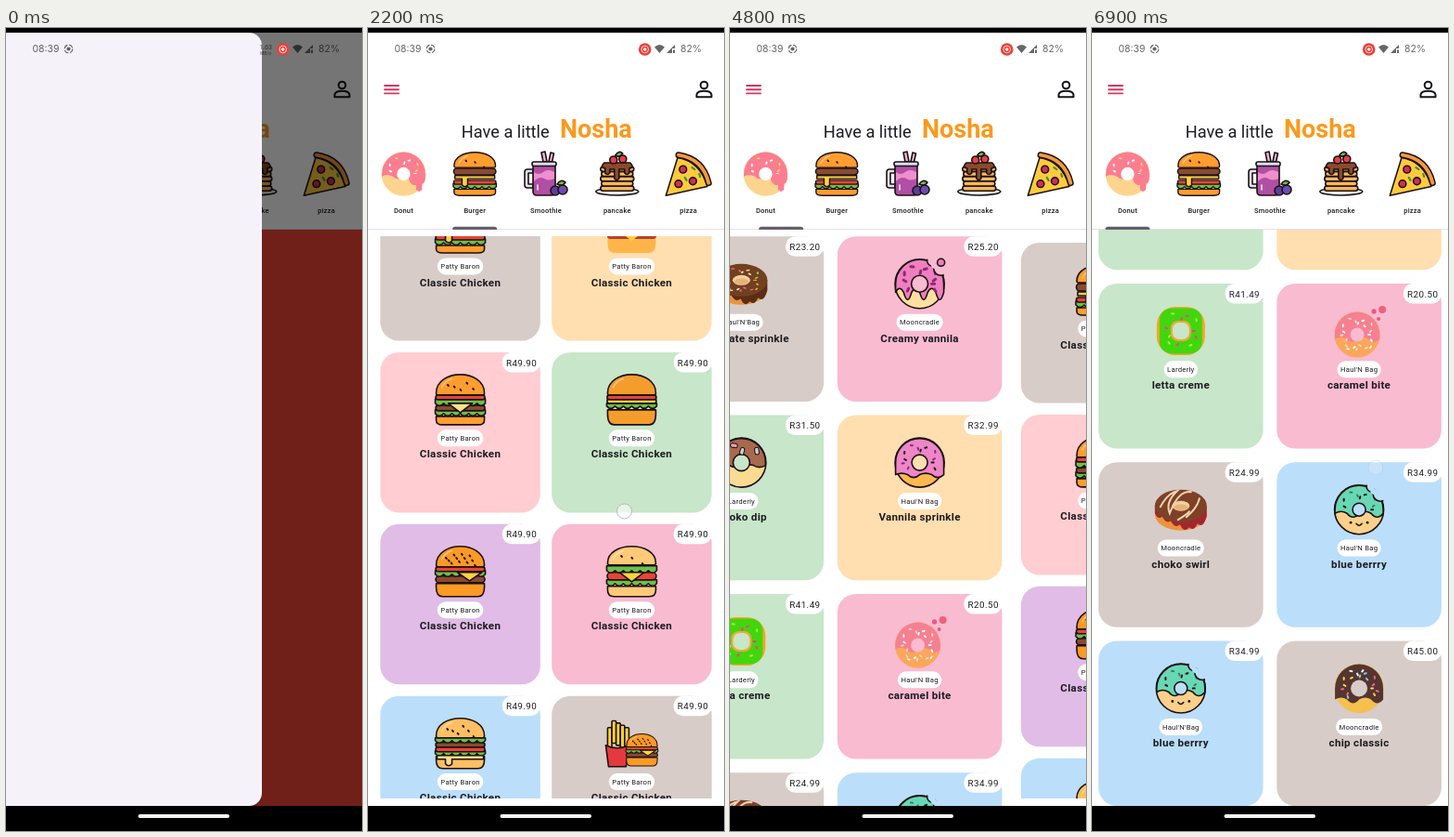
Animation of 384x864 px, one loop 7 s. Source, as an HTML page:

```html
<!DOCTYPE html>
<html lang="en">
<head>
<meta charset="utf-8">
<title>Snack menu</title>
<style>
  html, body { margin: 0; height: 100%; overflow: hidden; background: #000; }
  svg { display: block; width: 100vw; height: 100vh; font-family: Roboto, "Noto Sans", sans-serif; }
  .mid { text-anchor: middle; }
  .tab { font-size: 7.5px; font-weight: 500; letter-spacing: .2px; fill: #1d1b20; }
  .shop { font-size: 7.7px; letter-spacing: .25px; fill: #1d1b20; }
  .name { font-size: 11.6px; font-weight: 700; letter-spacing: .3px; fill: #1d1b20; }
  .price { font-size: 9.8px; letter-spacing: .45px; fill: #1d1b20; }
  .status { font: 10.4px Inter, Lato, sans-serif; }
  .ink { stroke: #1b1013; stroke-width: 1.6; stroke-linejoin: round; stroke-linecap: round; }
</style>
</head>
<body>
<svg id="stage" viewBox="0 0 384 864" preserveAspectRatio="none"></svg>
<script>
const path = (d, fill = 'none', more = '') => `<path d="${d}" fill="${fill}" ${more}/>`;
const rect = (x, y, w, h, fill, r = 0, more = '') =>
  `<rect x="${x}" y="${y}" width="${w}" height="${h}" rx="${r}" fill="${fill}" ${more}/>`;
const dot = (x, y, r, fill, more = '') => `<circle cx="${x}" cy="${y}" r="${r}" fill="${fill}" ${more}/>`;
const line = (d, color, w, more = '') =>
  path(d, 'none', `stroke="${color}" stroke-width="${w}" stroke-linecap="round" ${more}`);
const text = (x, y, s, cls, more = '') => `<text x="${x}" y="${y}" class="${cls}" ${more}>${s}</text>`;
const put = (x, y, inner, k = 1) => `<g transform="translate(${x} ${y}) scale(${k})">${inner}</g>`;
const ink = inner => `<g class="ink">${inner}</g>`;
const times = (n, f) => Array.from({ length: n }, (_, i) => f(i)).join('');

const GREEN = '#6cc04a', RED = '#ea4335', BROWN = '#8a4a2f', CHEESE = '#ffd23f', DARK = '#1b1013';

// Icons are drawn around 0,0 in a 56 px box.
const layers = {
  flat: (c, y, h) => rect(-26.5, y, 53, h, c, h / 2),
  wave: (c, y, h) => path(`M27 ${y}H-27V${y + h}` + times(6, () => 'q4.5 5 9 0') + 'Z', c),
  tri: (c, y, h, x = 0) => path(`M${x - 13} ${y}H${x + 13}L${x} ${y + h}Z`, c),
  drip: (c, y, h) => path(`M-25 ${y}H25V${y + 4}H-9v${h}q-3.5 4 -7 0v-${h}H-25Z`, c)
};

function burger({ bun, top = -5, bot = 14, peak = -27, seeds = 0, seed = DARK, flat, parts }) {
  const c = (peak - .25 * (top - 2)) / .75;
  const body =
    path(`M-26 ${bot}H26V${bot + 4}Q26 27 19 27H-19Q-26 27 -26 ${bot + 4}Z`, bun) +
    parts.map(([kind, ...a]) => layers[kind](...a)).join('') +
    path(`M-26 ${top - 2}C-26 ${c} 26 ${c} 26 ${top - 2}Q26 ${top} 24 ${top}H-24Q-26 ${top} -26 ${top - 2}Z`, bun);
  const grains = times(seeds, i => {
    const x = -17 + 34 * (i + .5) / seeds;
    return line(`M${x} ${peak + 8 + x * x / 60 + (i % 3) * 4}l.8 1`, seed, 2);
  });
  const shine = flat ? '' : line('M-20 -13Q-17 -20 -9 -22.5', '#fff', 1.4, 'opacity=".45"');
  return (flat ? body : ink(body)) + shine + grains;
}

const classic = burger({ bun: '#ff9d2e', top: -8, bot: 19, seeds: 3, parts: [
  ['wave', GREEN, 12, 4], ['flat', RED, 8, 5], ['drip', CHEESE, 2, 8], ['flat', BROWN, -7, 8]] });
const seeded = burger({ bun: '#fb9a25', bot: 13, seeds: 12, parts: [
  ['flat', BROWN, 5, 7], ['wave', GREEN, -1, 4], ['flat', RED, -5, 5], ['tri', CHEESE, 1, 9, 10]] });
const tall = burger({ bun: '#ffca78', top: -7, seeds: 3, bot: 16, parts: [
  ['wave', GREEN, 9, 4], ['flat', RED, 1, 8], ['wave', GREEN, -6, 5], ['tri', CHEESE, 1, 10]] });
const glazed = burger({ bun: '#ffbe62', top: -6, bot: 14, seeds: 6, parts: [
  ['wave', GREEN, 8, 3], ['flat', RED, 4, 5], ['flat', BROWN, -1, 5], ['wave', GREEN, -6, 3], ['drip', '#ffdc8c', 13, 5]] });
const combo = ink(
  times(5, i => rect(-26 + i * 4.6, -17 - (i * 3 % 4) * 2.4, 4.6, 24, CHEESE, 1)) +
  path('M-28 2Q-16 8 -3 2L-6 25H-25Z', '#e5383f')) + put(11, 7, seeded, .64);

const burgerArt = [
  classic,
  burger({ bun: '#fdb54a', top: 0, bot: 12, peak: -23, seeds: 9, seed: '#ffe6b4', flat: true, parts: [
    ['flat', '#b5422c', 6, 6], ['flat', '#85492f', 0, 8], ['tri', CHEESE, 4, 10]] }),
  burger({ bun: '#ff9d2e', bot: 18, seeds: 5, parts: [
    ['wave', GREEN, 11, 4], ['flat', BROWN, 6, 6], ['wave', GREEN, -1, 5], ['flat', RED, -5, 5], ['tri', '#ffe08a', 4, 10]] }),
  burger({ bun: '#f59d2c', bot: 11, parts: [
    ['wave', GREEN, 4, 3], ['flat', CHEESE, -1, 5], ['flat', RED, -5, 5]] }),
  seeded, tall, glazed, combo, classic
];

const sprinkles = (n, colors, maxY = 20, w = 2) => times(n, i => {
  const a = i * 2.4, r = 13 + (i * 5) % 9, x = r * Math.cos(a), y = r * Math.sin(a);
  const d = `M${x} ${y}l${w * Math.cos(a * 3)} ${w * Math.sin(a * 3)}`;
  return y > maxY ? '' : (w > 3 ? line(d, DARK, w + 2) : '') + line(d, colors[i % colors.length], w);
});

function donut({ base, frost, bg, y = 6, amp = 4, waves = 4, hole = 9, lined, bits, bitW, n = 16, maxY, bite }) {
  const step = 52 / waves;
  const wave = `M-26 ${y}V0A26 26 0 0 1 26 0V${y}` +
    times(waves, i => `q${-step / 2} ${(i % 2 ? -1 : 2) * amp} ${-step} 0`) + 'Z';
  const mouth = bite ? `<g clip-path="url(#disc)">${dot(14, -25, 6, bg)}${dot(23, -17, 8, bg)}` +
    dot(17, -21, 5, bg, 'stroke="none"') + '</g>' : '';
  const body = dot(0, 0, 26.5, base) + path(wave, frost) + dot(0, 0, hole, bg);
  const tail = sprinkles(n, bits, maxY ?? y - 2, bitW);
  return lined ? ink(body) + tail + ink(mouth) : body + tail + mouth;
}

function cakeRing(top, side, bits) {
  const e = (y, rx, ry, f) => `<ellipse cx="0" cy="${y}" rx="${rx}" ry="${ry}" fill="${f}"/>`;
  return e(5, 28, 17.5, '#e9953c') +
    path('M-28 -4V4q4 8 8 3q4 9 9 5q5 9 10 4q5 10 10 3q5 5 9 -4q6 6 10 -8V-4Z', side) +
    e(-4, 28, 17.5, top) + e(-4, 9.5, 5.5, '#f4cf9c') + e(-2.5, 7.5, 3.2, '#e6b27c') + bits;
}

const squash = s => `<g transform="translate(0 -4) scale(1.05 .66)">${s}</g>`;
const bubbles = dot(16, -21, 2.6, '#f0567f') + dot(25, -23, 4, '#f0607a') + dot(21, -13, 2, '#f0567f');
const smile = dot(-9, 14, 1.4, DARK) + dot(9, 14, 1.4, DARK) + line('M-3 15q3 4 6 0', DARK, 1.5);
const mint = bg => donut({ base: '#fbd08a', frost: '#68d8b4', bg, y: 4, hole: 7, lined: true, bits: [DARK, '#2d7e70'], bite: true }) + smile;

const donutArt = [
  () => cakeRing('#70401f', '#5a2d14', squash(sprinkles(20, ['#ff9d3a', '#8fd05c', '#ffe9b8', '#f2648a']))),
  bg => donut({ base: '#ffe0a0', frost: '#f07fc0', bg, y: 9, amp: 8, waves: 6, lined: true, bits: ['#8d2a73'], n: 14, bitW: 3, bite: true }) +
    ink(dot(23, -23, 4, '#f07fc0')),
  bg => donut({ base: '#fbdb92', frost: '#a8694d', bg, y: 3, amp: 2, lined: true, bits: ['#fff0cc', '#e8a0a0', '#c9cfd6'], n: 10, maxY: -3, bitW: 3.4 }),
  bg => donut({ base: '#fdb94f', frost: '#ee86c8', bg, y: 13, amp: 3, hole: 8.5, lined: true, bits: [DARK, '#7d2c82'], n: 18 }),
  bg => rect(-26, -26, 52, 52, '#f7a429', 20) + rect(-23, -24.5, 46, 49, '#42d60e', 13) +
    rect(-11, -11, 22, 22, '#f6a63c', 8) + rect(-9, -9, 18, 18, bg, 7) + sprinkles(11, ['#f2408a', '#a6f02f']),
  bg => put(-2, 4, donut({ base: '#fba75a', frost: '#f58092', bg, y: 5, amp: 4, hole: 8, bits: ['#fff', '#ffd9c4'], n: 20, maxY: 22 }), .93) + bubbles,
  () => cakeRing('#7d4128', '#a3262d',
    line('M-22 -3Q-14 -18 -4 -20Q-17 -8 -12 4Q-2 -22 11 -19M6 8Q18 -2 20 -12M-3 11Q8 4 9 2', '#f6d4b0', 2)),
  mint, mint,
  bg => donut({ base: '#f5c04d', frost: '#54352f', bg, y: 12, amp: 4, bits: ['#ffcf4e', '#f2648a', '#7fd0e8', '#fff'], n: 24 })
];

// Header icons, 48 px box.
const donutIcon = put(0, 0, donut({ base: '#fdd48e', frost: '#fb7d90', bg: '#fff', y: 3, amp: 3, hole: 8, bits: ['#fff', '#ffd86b'], n: 14 }) +
  path('M6 6L9 0H26V6Q25 11 22 12V19Q18.5 23 15 19V13Q9 15 6 6Z', '#fb7d90'), .9);
const smoothieIcon = ink(
  path('M-14 -5h-6q-3 0 -3 3v14q0 3 3 3h6v-4h-5v-12h5Z', '#dfe5ee') +
  path('M-3 -13L-5 -23l4 -1l2 11ZM3 -13L5 -23l3.5 1l-2 9Z', '#f6b5d6') +
  path('M-14 -9H10V19Q10 23 6 23H-10Q-14 23 -14 19Z', '#b04fa3') + rect(-15, -13, 26, 4.5, '#d9dde8', 2) +
  dot(10, 18, 5, '#5a3f97') + dot(18, 17, 5, '#6d4bb0') + path('M12 11q4 -6 9 -2q-3 5 -9 2Z', GREEN)) +
  path('M-13 -2q5 4 10 0t12 0v7q-6 3 -11 0t-11 3Z', '#ee8fce') + line('M-9 12v5', '#fff', 1.5);
const pancakeIcon = ink(
  `<ellipse cx="0" cy="19" rx="23" ry="4" fill="#e4e8ee"/>` +
  times(5, i => rect(-18 + i % 2, 13 - i * 5.2, 36 - 2 * (i % 2), 5.2, '#f7b85c', 2.6)) +
  path('M-14 -12H14q5 5 -1 6v5q-2.5 3 -5 0v-4H2v10q-2.5 3 -5 0V-5h-5v4q-2.5 3 -5 0v-5q-6 -1 -1 -6Z', '#8c4a2c') +
  dot(-4, -15, 4, '#e83d45') + dot(6, -16, 4, '#e83d45') + path('M-2 -20q4 -6 8 -2q-3 5 -8 2Z', GREEN));
const pizzaIcon = put(0, 0, ink(path('M-25 24L-12 -18Q13 -14 21 14Z', '#ffcb3e')) +
  line('M-11 -21Q16 -17 22.5 10', DARK, 7) + line('M-11 -21Q16 -17 22.5 10', '#f39a3f', 4) +
  ink([[-6, -5], [5, 8], [-11, 11]].map(([x, y]) => dot(x, y, 4, '#d42d58')).join('')) +
  line('M4 -7l3 2M-4 4l2 3M12 0l1 3', '#3f8f37', 2.2), .97);

const FIRST = 'Patty Baron', HAUL = "Haul'N'Bag", HAUL2 = "Haul'N Bag", MOON = 'Mooncradle', LARD = 'Larderly';
const C = { taupe: '#d7ccc8', peach: '#ffdeb0', rose: '#ffcdd2', mint: '#c8e6c9', lilac: '#e0bce6', pink: '#f8bbd0', sky: '#bbdefb' };

const donuts = [
  ['Chocolate sprinkle', HAUL, 'R23.20', C.taupe], ['Creamy vannila', MOON, 'R25.20', C.pink],
  ['Choko dip', LARD, 'R31.50', C.mint], ['Vannila sprinkle', HAUL2, 'R32.99', C.peach],
  ['letta creme', LARD, 'R41.49', C.mint], ['caramel bite', HAUL2, 'R20.50', C.pink],
  ['choko swirl', MOON, 'R24.99', C.taupe], ['blue berrry', HAUL2, 'R34.99', C.sky],
  ['blue berrry', HAUL, 'R34.99', C.sky], ['chip classic', MOON, 'R45.00', C.taupe]
];
const burgers = [C.taupe, C.peach, C.rose, C.mint, C.lilac, C.pink, C.sky, C.taupe, C.mint]
  .map(c => ['Classic Chicken', FIRST, 'R49.90', c]);

const card = ([name, shop, price, bg], art, w) =>
  rect(0, 0, w, w, bg, 20) + rect(w - 41, 0, 41, 21.5, '#fff', 10) +
  text(w - 20.2, 14.7, price, 'price mid') +
  put(w / 2, 51, typeof art === 'string' ? art : art(bg)) +
  `<g transform="translate(${w / 2} 92.4)"><rect class="pill" y="-9" height="18" rx="9" fill="#fff"/>` +
  text(0, 2.7, shop, 'shop mid') + '</g>' + text(w / 2, 113.6, name, 'name mid');

const grid = (items, art, x, y, w, step) => items.map((it, i) =>
  put(x + (i % 2) * step, y + (i >> 1) * step, card(it, art[i], w))).join('');

const clip = (id, inner) => `<clipPath id="${id}">${inner}</clipPath>`;
const tabs = [['Donut', donutIcon, 1], ['Burger', classic, .86], ['Smoothie', smoothieIcon, 1],
  ['pancake', pancakeIcon, 1], ['pizza', pizzaIcon, 1]];

const header = rect(0, 5, 384, 212, '#fff') + rect(0, 216, 384, 1, '#e4e1e6') +
  line('M18 62H33M18 66.2H33M18 70.4H33', '#d4365f', 1.9) +
  `<g fill="none" stroke="#15141a" stroke-width="2" stroke-linejoin="round">
    <circle cx="362.5" cy="61.5" r="3.8"/><path d="M354.5 74.3V71.5Q355.5 67.8 362.5 67.8T370.5 71.5V74.3Z"/></g>` +
  text(100.8, 117.5, 'Have a little', '', 'font-size="18.2" fill="#1d1b20"') +
  text(207, 117.5, 'Nosha', '', 'font-size="27" font-weight="700" fill="#fb991c"') +
  tabs.map(([label, icon, k], i) => put(38.4 + 76.8 * i, 157, icon, k) +
    text(38.4 + 76.8 * i, 199.3, label, 'tab mid')).join('') +
  `<path id="bar" d="M0 217V216.5Q0 213.8 3 213.8H45Q48 213.8 48 216.5V217Z" fill="#655f6d"/>`;

const status = `<g fill="#000" fill-opacity=".6">` +
  text(28.5, 26.3, '08:39', 'status') + text(337, 26.3, '82%', 'status') +
  dot(67.5, 22.5, 2.1, '#000') + path('M309 20.5Q314.5 15.5 320 20.5L314.5 27Z', '#000') +
  path('M322 27L331 18V22H328V27Z', '#000') + path('M329 23.5h2V27h-2Z', '#000') + '</g>' +
  dot(67.5, 22.5, 4.3, 'none', 'stroke="#000" stroke-opacity=".6" stroke-width="1.1" stroke-dasharray="5 1.75"') +
  dot(298.7, 23, 6.8, '#ee3f36') + dot(298.7, 23, 3.8, 'none', 'stroke="#fff" stroke-width=".8"') + dot(298.7, 23, 1.7, '#fff') +
  `<g id="speed" class="mid" fill="#000" fill-opacity=".6">` +
  text(280, 23, '1.63', '', 'font-size="7"') + text(280, 28.5, 'MB/s', '', 'font-size="5"') + '</g>';

const $ = id => document.getElementById(id);
$('stage').innerHTML = '<defs>' +
  clip('app', rect(0, 5, 384, 832, '#000')) + clip('burgerBox', rect(7, 224, 370, 605, '#000')) +
  clip('donutBox', rect(0, 217, 384, 620, '#000')) + clip('disc', dot(0, 0, 28, '#000')) + '</defs>' +
  rect(0, 0, 384, 864, '#000') + '<g clip-path="url(#app)">' + rect(0, 5, 384, 832, '#fff') +
  `<g id="pages">
    <g clip-path="url(#donutBox)"><g id="donutList">${grid(donuts, donutArt, 7, 224.3, 177.6, 192.3)}</g></g>
    <g transform="translate(384 0)"><g clip-path="url(#burgerBox)"><g id="burgerList">${grid(burgers, burgerArt, 13.3, 231, 172.5, 184.9)}</g></g></g>
    ${rect(768, 217, 384, 620, '#f44336')}
  </g>` + header +
  `<rect id="scrim" y="5" width="384" height="832"/>
   <rect id="drawer" x="-20" y="5" width="296" height="832" rx="14" fill="#f6f2fa"/>` +
  status + dot(0, 0, 8, '#fff', 'id="touch" fill-opacity=".6" stroke="#b4b8d0" stroke-width="1"') + '</g>' +
  rect(142.5, 846, 98.5, 4, '#f4f4f4', 2);

document.querySelectorAll('.pill').forEach(p => {
  const w = p.nextElementSibling.getComputedTextLength() + 7;
  p.setAttribute('width', w);
  p.setAttribute('x', -w / 2);
});

// Tracks: [time, value, easing into this point].
const ease = { lin: u => u, in: u => u * u, out: u => 1 - (1 - u) ** 3, both: u => u * u * (3 - 2 * u) };
const tracks = {
  drawer: [[0, 0], [350, -150, 'in'], [750, -277, 'out']],
  page: [[800, -768], [1050, -600, 'in'], [1300, -396.7, 'out'], [1700, -384, 'out'],
    [4300, -384], [4600, -250, 'in'], [4800, -83.5, 'lin'], [5400, 0, 'out']],
  burger: [[1800, 0], [2200, 67, 'in'], [2600, 225, 'lin'], [3000, 321, 'out'],
    [3300, 321], [3600, 146, 'in'], [4200, 0, 'out']],
  donut: [[5600, 0], [6000, 110, 'in'], [6400, 207, 'out'], [6500, 207], [6900, 334, 'both']]
};
// Drags: start, end, x, y at zero scroll, list held by the finger.
const drags = [[1900, 2500, 276.5, 587, 'burger'], [3400, 3600, 313, 654, 'burger'],
  [5600, 6100, 285.5, 605, 'donut'], [6600, 6900, 306, 807, 'donut']];

function at(name, t) {
  const keys = tracks[name], i = keys.findIndex(k => k[0] > t);
  if (i < 0) return keys[keys.length - 1][1];
  if (!i) return keys[0][1];
  const [t0, a] = keys[i - 1], [t1, b, e = 'lin'] = keys[i];
  return a + (b - a) * ease[e]((t - t0) / (t1 - t0));
}

const LOOP = 7000, STEP = 100;
const move = (id, x, y) => $(id).setAttribute('transform', `translate(${x} ${y})`);

function draw(ms) {
  const t = Math.floor((ms + 30) / STEP) * STEP % LOOP;
  const page = at('page', t), drawer = at('drawer', t);
  move('pages', page, 0);
  move('bar', 14.4 - page / 5, 0);
  move('burgerList', 0, -at('burger', t));
  move('donutList', 0, -at('donut', t));
  move('drawer', drawer, 0);
  $('scrim').setAttribute('opacity', .54 * (1 + drawer / 277));
  $('speed').setAttribute('opacity', t < 900 ? 1 : 0);
  const d = drags.find(([a, b]) => t >= a && t <= b);
  $('touch').setAttribute('opacity', d ? (t === d[1] ? .3 : 1) : 0);
  if (d) move('touch', d[2], d[3] - at(d[4], t));
}

const start = performance.now();
function tick() {
  draw(performance.now() - start);
  requestAnimationFrame(tick);
}
tick();
</script>
</body>
</html>
```
